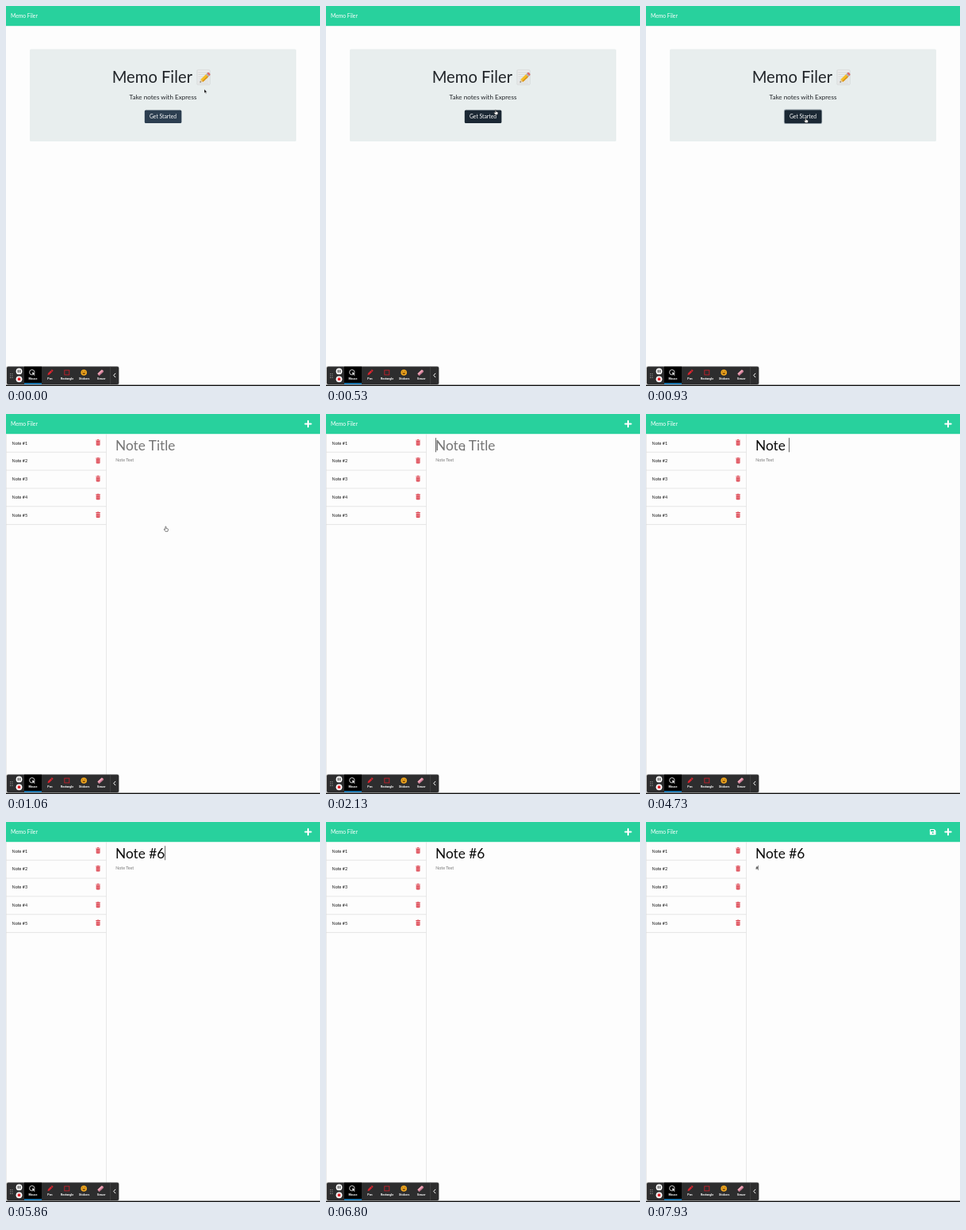
Recreate the animation shown at these times as an HTML page. Size 396x480 px, loop 8000 ms.

```html
<!DOCTYPE html>
<html lang="en">
<head>
<meta charset="utf-8">
<title>Memo Filer</title>
<style>
  html, body { margin: 0; width: 100%; height: 100%; overflow: hidden; background: #fdfdfd; }
  svg { display: block; width: 396px; height: 480px; }
  text { font-family: Lato, sans-serif; white-space: pre; }
  .label { font: 700 3.6px Roboto, sans-serif; fill: #fff; text-anchor: middle; }
  .mid { text-anchor: middle; }
</style>
</head>
<body>
<svg viewBox="0 0 396 480" xmlns="http://www.w3.org/2000/svg">
  <defs>
    <g id="trash" fill="#dc4450">
      <path d="M-2.8-3.3h1.6l.5-.6h1.4l.5.6h1.6v.9h-5.6z"/>
      <path d="M-2.4-2h4.8v4.9q0 .8-.8.8h-3.2q-.8 0-.8-.8z"/>
      <path d="M-1.2-1.1v3.8M0-1.1v3.8M1.2-1.1v3.8" stroke="#f3b4b8" stroke-width=".45"/>
    </g>
  </defs>
  <rect width="396" height="480" fill="#fdfdfd"/>
  <rect width="396" height="25.2" fill="#28d19d"/>
  <text x="6" y="15.1" font-size="6.75" fill="#fff">Memo Filer</text>

  <g id="home">
    <rect x="30" y="54.5" width="336" height="116.5" rx="1.6" fill="#e8eeee"/>
    <text x="235" y="97" font-size="20.2" fill="#212529" text-anchor="end">Memo Filer</text>
    <g>
      <rect x="241" y="80.8" width="16.2" height="18.6" rx=".8" fill="#eceded" stroke="#c9cdcd" stroke-width=".6"/>
      <path d="M242.5 84h13M242.5 86.7h13M242.5 89.4h13M242.5 92.1h13M242.5 94.8h13M242.5 97.3h13"
        stroke="#b9c0c3" stroke-width=".5"/>
      <g transform="translate(244.6 96.6) rotate(-44)">
        <path d="M0 0l3.4-2.2v4.4z" fill="#e6c79a"/>
        <path d="M0 0l1.3-.85v1.7z" fill="#333"/>
        <path d="M3.4-2.2h9.2v4.4H3.4z" fill="#f4bd27"/>
        <path d="M3.4.7h9.2v1.5H3.4z" fill="#d9921c"/>
        <path d="M12.6-2.2h1.7v4.4h-1.7z" fill="#a9adb0"/>
        <path d="M14.3-2.2h1.4q1.2 0 1.2 2.2t-1.2 2.2h-1.4z" fill="#dd6d6b"/>
      </g>
    </g>
    <text class="mid" x="198" y="117.8" font-size="8.1" fill="#212529">Take notes with Express</text>
    <rect id="ring" x="173.9" y="130.4" width="48.2" height="18.6" rx="2" fill="#8f9ba4"/>
    <rect id="button" x="174.8" y="131.4" width="46.6" height="16.7" rx="1.5"/>
    <text class="mid" x="198" y="142.2" font-size="6.75" fill="#fff">Get Started</text>
  </g>

  <g id="notes">
    <path d="M126.5 25.2V478M.3 25.2V478" stroke="#dedede" stroke-width=".7"/>
    <g id="list"></g>
    <path d="M381 8.8v7.4M377.3 12.5h7.4" stroke="#fff" stroke-width="2" stroke-linecap="round"/>
    <g id="save">
      <path d="M358.7 8.9h4.8l2 2v4.6q0 .8-.8.8h-6q-.8 0-.8-.8v-5.8q0-.8.8-.8z" fill="#fff"/>
      <path d="M359 10h4v2h-4z" fill="#28d19d"/>
      <circle cx="361.7" cy="14" r="1.05" fill="#28d19d"/>
    </g>
    <text id="title" x="138" y="45.9" font-size="17.3"></text>
    <text id="body" x="138.2" y="59.6" font-size="5.4"></text>
    <rect id="caret"/>
  </g>

  <rect y="478.6" width="396" height="1.4" fill="#111"/>
  <g>
    <rect x=".2" y="454.8" width="142.8" height="24" rx="2.4" fill="#000" opacity=".18"/>
    <rect x="1" y="455.6" width="141.2" height="22.4" rx="1.8" fill="#2d2d2e"/>
    <rect x="23" y="455.6" width="22" height="22.4" fill="#000"/>
    <rect x="23" y="476.2" width="22" height="1.6" fill="#2492d8"/>
    <path d="M5.6 464.2v6M7.9 464.2v6" stroke="#aaa" stroke-width="1" stroke-dasharray="1 1.4"/>
    <circle cx="16.5" cy="461.4" r="3.9" fill="#fff"/>
    <path d="M15.3 459.6v3.6M17.7 459.6v3.6" stroke="#222" stroke-width="1.1"/>
    <circle cx="16.5" cy="471.3" r="3.9" fill="#fff"/>
    <rect x="14.7" y="469.5" width="3.6" height="3.6" rx=".5" fill="#e0262c"/>
    <circle cx="32.8" cy="462.7" r="3.2" fill="none" stroke="#fff" stroke-width=".8"/>
    <path d="M33 462.2l4 2-1.6.5 1.2 1.7-.9.6-1.1-1.7-1.2 1.2z" fill="#fff" stroke="#000" stroke-width=".3"/>
    <g transform="translate(52.5 466.2) rotate(-45)" fill="#d9252f">
      <path d="M0 0l1.8-1.2h5v2.4h-5z"/><path d="M7.3-1.2h1.6v2.4H7.3z"/>
    </g>
    <rect x="73.8" y="460.1" width="6" height="5.8" fill="none" stroke="#c3202b" stroke-width=".9"/>
    <circle cx="98.2" cy="463" r="3.8" fill="#f3a91f"/>
    <path d="M95.9 463.6q2.3 3.4 4.6 0z" fill="#6d3f0a"/>
    <path d="M96.8 461v1.2M99.6 461v1.2" stroke="#6d3f0a" stroke-width=".8"/>
    <g transform="translate(119.3 463.1) rotate(-43)">
      <rect x="-4" y="-1.7" width="8" height="3.4" rx=".7" fill="#f3a5b8"/>
      <path d="M-4 .3h8v.7q0 .7-.7.7h-6.6q-.7 0-.7-.7z" fill="#c87791"/>
    </g>
    <g id="tools"></g>
    <path d="M131.6 455.6v22.4" stroke="#555" stroke-width=".5"/>
    <path d="M138.2 463.9l-2.4 2.6 2.4 2.6" fill="none" stroke="#fff" stroke-width="1"/>
  </g>

  <g id="arrow"><path d="M0 0v5l1.2-1 .8 1.8.9-.4-.8-1.7h1.6z" fill="#111" stroke="#fff" stroke-width=".4"/></g>
  <g id="hand">
    <path d="M-1.1-2.8q.6-.6 1.1 0v2l2 .5q.7.3.5 1.2l-.5 2.2h-3L-2.7.7q0-.9.8-.6l.8.6z"
      fill="#fff" stroke="#222" stroke-width=".55"/>
  </g>
  <g id="beam"><path d="M-1-2.9q1 0 1 .7v4.4q0 .7-1 .7M1-2.9q-1 0-1 .7v4.4q0 .7 1 .7" fill="none" stroke="#555" stroke-width=".6"/></g>
</svg>
<script>
const LOOP = 8000, STEP = 200 / 3;
const el = id => document.getElementById(id);
const show = (id, on) => { el(id).style.display = on ? "" : "none"; };
const pen = document.createElement("canvas").getContext("2d");

el("list").innerHTML = [1, 2, 3, 4, 5].map((n, i) => {
  const y = 36.5 + i * 22.85;
  return `<text x="7.6" y="${y + 2.1}" font-size="5.4" fill="#111">Note #${n}</text>
    <use href="#trash" x="116.1" y="${y - .5}"/>
    <path d="M0 ${y + 11.7}H126.5" stroke="#dcdcdc" stroke-width=".7"/>`;
}).join("");

el("tools").innerHTML = ["Mouse", "Pen", "Rectangle", "Stickers", "Eraser"].map((name, i) =>
  `<text class="label" x="${33.9 + i * 21.6}" y="472.4">${name}</text>`).join("");

// Each row starts at its time and holds until the next.
const titleSteps = [[0, ""], [3330, "N"], [3800, "No"], [4000, "Not"], [4200, "Note"],
  [4660, "Note "], [5460, "Note #"], [5860, "Note #6"]];
const bodySteps = [[0, ""], [7860, "#"]];
const caretSteps = [[0, ""], [2130, "title"], [2930, ""], [3330, "title"], [5260, ""],
  [5460, "title"], [6260, "body"], [6800, ""], [7260, "body"], [7800, ""], [7860, "body"]];
const moves = [
  { from: 60, to: 860, a: [250, 105], b: [202, 144.5] },
  { from: 1330, to: 2130, a: [202, 145.2], b: [174.3, 43.3] }
];

const at = (steps, t) => steps.filter(s => s[0] <= t).pop()[1];

function pointer(t) {
  const m = moves[t < 1060 ? 0 : 1];
  const held = t < m.from ? m.from : m.from + (Math.floor((t - m.from) / STEP) + 1) * STEP;
  const p = Math.min(1, (held - m.from) / (m.to - m.from));
  const k = p * p * (3 - 2 * p);
  return m.a.map((v, i) => v + (m.b[i] - v) * k);
}

function textWidth(text, size) {
  pen.font = "100px Lato, sans-serif";
  return pen.measureText(text).width * size / 100;
}

function field(id, value, hint, hintColor) {
  const node = el(id), text = value || hint;
  if (node.textContent !== text) node.textContent = text;
  node.setAttribute("fill", value ? "#0b0b0b" : hintColor);
}

function placeCaret(target, value) {
  show("caret", target);
  if (!target) return;
  const big = target === "title", size = big ? 17.3 : 5.4;
  const box = { x: (big ? 138 : 138.2) + textWidth(value, size), y: big ? 30.2 : 54.8,
    width: big ? .7 : .5, height: big ? 18 : 6, fill: "#222" };
  for (const key in box) el("caret").setAttribute(key, box[key]);
}

function draw(t) {
  const home = t < 1060, [x, y] = pointer(t);
  const over = home && x > 174.8 && x < 221.4 && y > 131.4 && y < 148.1;
  show("home", home);
  show("notes", !home);
  show("ring", t >= 930);
  el("button").setAttribute("fill", over ? "#1b2834" : "#2c3e50");

  const title = at(titleSteps, t), body = at(bodySteps, t), focus = at(caretSteps, t);
  field("title", title, "Note Title", "#757575");
  field("body", body, "Note Text", "#757575");
  placeCaret(focus, focus === "title" ? title : body);
  show("save", t >= 7930);

  const shape = t >= 3330 ? "" : over || (!home && t < 1130) ? "hand" : home ? "arrow" : "beam";
  for (const id of ["arrow", "hand", "beam"]) {
    show(id, id === shape);
    el(id).setAttribute("transform", `translate(${x} ${y})`);
  }
}

const start = performance.now();
function tick() {
  draw((performance.now() - start) % LOOP);
  requestAnimationFrame(tick);
}
tick();
</script>
</body>
</html>
```
